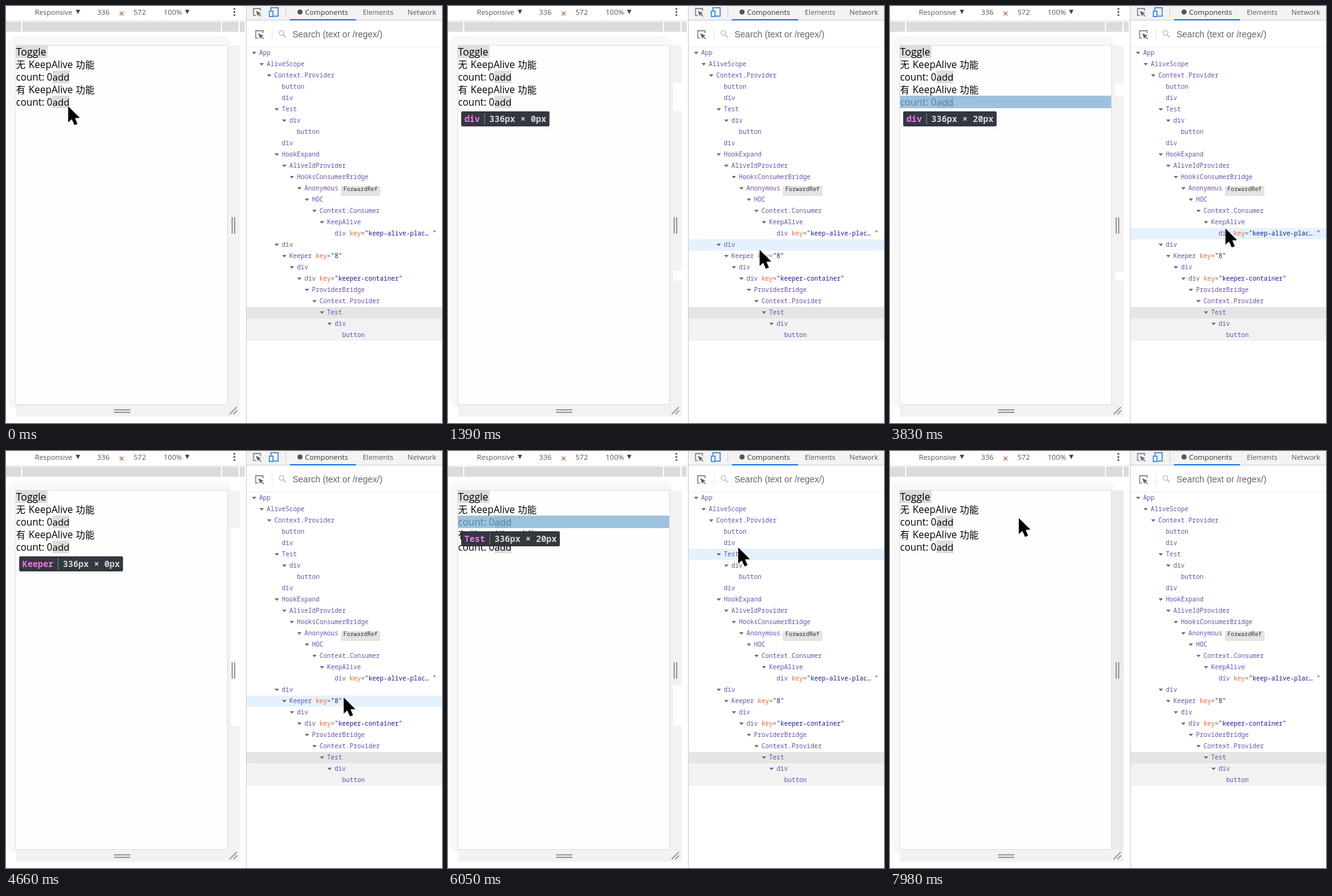
Recreate the animation shown at these times as an HTML page with a canvas. Size 694 by 665 pixels, loop 8 s.

```html
<!DOCTYPE html>
<html lang="en">
<head>
<meta charset="utf-8">
<title>Component inspector</title>
<style>
html, body { margin: 0; width: 100%; height: 100%; overflow: hidden; background: #fff; }
canvas { display: block; }
</style>
</head>
<body>
<canvas id="stage" width="694" height="665"></canvas>
<script>
const ctx = document.getElementById('stage').getContext('2d');
const LOOP = 8000;
const UI = '"Open Sans", "Noto Sans CJK SC", "Noto Sans CJK", sans-serif';
const CJK = '"Noto Sans CJK SC", "Noto Sans CJK", sans-serif';
const MONO = '"Noto Sans Mono", monospace';
const PURPLE = '#6a51b2';

// Each line: depth, name, optional key; "+" marks an expanded node.
const tree = `0+App
1+AliveScope
2+Context.Provider
3 button
3 div
3+Test
4+div
5 button
3 div
3+HookExpand
4+AliveIdProvider
5+HooksConsumerBridge
6+Anonymous
7+HOC
8+Context.Consumer
9+KeepAlive
10 div keep-alive-plac…_
3+div
4+Keeper 8
5+div
6+div keeper-container
7+ProviderBridge
8+Context.Provider
9+Test
10+div
11 button`.split('\n').map(line => {
  const [, depth, mark, name, key] = line.match(/^(\d+)([+ ])(\S+)(?: (\S+))?$/);
  return { x: 403 + 12 * depth, open: mark === '+', name, key: key && key.replace('_', ' ') };
});
const rowTop = i => 66 + 18 * i;

// Pointer moves: start, end, steps, evenly spaced waypoints.
const moves = [
  [610, 1390, 12, [[400, 425], [440, 460], [482, 445], [496, 389]]],
  [1610, 1760, 3, [[503, 399]]],
  [2410, 2560, 3, [[525, 352]]],
  [3030, 3200, 3, [[529, 365], [530, 380], [531, 391]]],
  [3390, 3830, 7, [[534, 355]]],
  [4050, 4440, 7, [[537, 393]]],
  [4660, 5090, 7, [[541, 395]]],
  [5150, 5340, 4, [[542, 343], [543, 337]]],
  [5640, 6190, 9, [[520, 270], [466, 158], [454, 146]]],
  [6340, 6460, 2, [[460, 163]]],
  [7080, 7230, 3, [[372, 150]]],
  [7380, 7710, 6, [[430, 146], [450, 170]]],
  [7860, 7980, 3, [[205, 107]]]
];

// Time, hovered row, row named in the tooltip (same row if left out).
const hovers = [
  [0, -1], [750, 20], [820, 21], [1180, 20], [1250, 18], [1320, 17],
  [1685, 18], [2485, 16], [2560, 15], [3115, 16], [3200, 17],
  [3610, 16], [4245, 17], [4375, 18], [5213, 16, 18], [5276, 15, 16], [5340, 15],
  [5709, 13], [5777, 11], [5846, 9], [5915, 7], [5984, 5], [6120, 4],
  [6460, 5], [7155, -1], [7446, 4], [7578, 5], [7920, -1]
];

// Time and the pale gaps in the strip beside the page.
const strips = [
  [0, []], [610, [[123, 168], [422, 438]]], [2410, [[123, 143], [424, 438]]],
  [4660, [[123, 438]]], [5640, [[374, 438]]], [7860, []]
];

const current = (list, t) => list.filter(e => e[0] <= t).pop();

function pointer(t) {
  let pos = [99, 160];
  for (const [t0, t1, n, points] of moves) {
    if (t < t0) break;
    const k = Math.min(n, Math.floor((t - t0) / (t1 - t0) * (n - 1) + 0.1) + 1);
    const path = [pos, ...points];
    const p = k / n * points.length;
    const i = Math.min(points.length - 1, Math.floor(p));
    pos = [0, 1].map(a => path[i][a] + (path[i + 1][a] - path[i][a]) * (p - i));
  }
  return pos;
}

function box(x, y, w, h, color, r = 0) {
  ctx.fillStyle = color;
  ctx.beginPath();
  ctx.roundRect(x, y, w, h, r);
  ctx.fill();
}

function text(s, x, y, size, color, family = UI, weight = '') {
  ctx.font = `${weight} ${size}px ${family}`;
  ctx.fillStyle = color;
  ctx.fillText(s, x, y);
}

function poly(points, color) {
  ctx.fillStyle = color;
  ctx.beginPath();
  points.forEach(([x, y]) => ctx.lineTo(x, y));
  ctx.closePath();
  ctx.fill();
}

function line(points, color, width = 1) {
  ctx.strokeStyle = color;
  ctx.lineWidth = width;
  ctx.beginPath();
  points.forEach(([x, y], i) => i ? ctx.lineTo(x, y) : ctx.moveTo(x, y));
  ctx.stroke();
}

function disc(x, y, r, color) {
  ctx.fillStyle = color;
  ctx.beginPath();
  ctx.arc(x, y, r, 0, 7);
  ctx.fill();
}

const down = (x, y, w, h, color) => poly([[x, y], [x + w, y], [x + w / 2, y + h]], color);

function inspectIcon(x, y, s) {
  line([[x + 4 * s, y + 12 * s], [x, y + 12 * s], [x, y], [x + 12 * s, y], [x + 12 * s, y + 4 * s]], '#6b6f73', 1.3);
  poly([[4, 4], [13, 8], [9.6, 9.2], [13.5, 13], [12.5, 14], [8.7, 10.2], [7.5, 13.5]]
    .map(([a, b]) => [x + a * s, y + b * s]), '#5f6368');
}

function toolbars() {
  text('Responsive', 46, 14, 11.3, '#555');
  down(111, 6, 7, 7, '#444');
  text('336', 145, 14, 11.5, '#555');
  line([[181, 9], [187, 15]], '#b9674d', 1.2);
  line([[187, 9], [181, 15]], '#b9674d', 1.2);
  text('572', 203, 14, 11.5, '#555');
  text('100%', 251, 14, 11.5, '#555');
  down(285, 6, 7, 7, '#444');
  [5, 10, 15].forEach(y => disc(363.5, y - 0.5, 1.6, '#606060'));

  box(0, 23, 382, 1, '#e4e4e4');
  [[0, 24], [26, 316], [344, 26], [372, 8]].forEach(([x, w]) => box(x, 25, w, 16, '#dbdbdb'));

  box(382, 0, 1, 665, '#cbcbcb');
  box(383, 0, 311, 23, '#f3f3f3');
  box(383, 22, 311, 1, '#cdcdcd');
  inspectIcon(394, 4, 0.93);
  ctx.strokeStyle = '#1a73e8';
  ctx.lineWidth = 1.4;
  ctx.strokeRect(421.7, 2.7, 11.5, 13.5);
  box(418, 7, 8, 11, '#f3f3f3');
  ctx.strokeRect(419.2, 8.2, 5.8, 8.6);
  box(445, 2, 1, 16, '#ccc');
  disc(468, 9.5, 4, '#555');
  text('Components', 476, 14, 11.4, '#333');
  text('Elements', 568, 14, 11.3, '#5a5a5a');
  text('Network', 639, 14, 11.5, '#5a5a5a');
  box(452, 21, 105, 2, '#1a73e8');

  inspectIcon(397.5, 39.5, 0.97);
  box(423, 35, 1, 20, '#e6e6e6');
  ctx.strokeStyle = '#c4c4c4';
  ctx.lineWidth = 1.5;
  ctx.beginPath();
  ctx.arc(438.5, 43, 3.7, 0, 7);
  ctx.stroke();
  line([[441, 45.5], [445.5, 50]], '#c4c4c4', 1.8);
  text('Search (text or /regex/)', 456, 50, 14, '#666', '"Liberation Sans", sans-serif');
  box(383, 65, 311, 1, '#ececec');
}

function device(t) {
  box(3, 48, 355, 594, '#f8f8f8', 14);
  const late = t >= 7860;
  box(353, 63, 19, 573, late ? '#ebebeb' : '#f2f2f2');
  current(strips, t)[1].forEach(([a, b]) => box(358, a, 14, b - a, '#fff'));
  box(16, 636, 356, 19, '#f2f2f2');
  box(15, 62, 338, 574, '#dedede');
  box(16, 63, 336, 572, '#fefefe');
  [359, 363].forEach(x => box(x, 337, 2, 26, '#999'));
  [643, 647].forEach(y => box(172, y, 26, 2, '#999'));
  line([[356, 651], [367.5, 639.5]], '#999', 1.8);
  line([[362, 651], [368, 645]], '#999', 1.8);

  box(16, 63, 50, 20, '#dcdcdc');
  text('Toggle', 16, 79, 16, '#000');
  ['无', '有'].forEach((word, i) => {
    const y = 99 + 40 * i;
    text(word, 16, y, 15, '#000', CJK);
    text('KeepAlive', 36, y, 15.5, '#000');
    text('功能', 111, y, 15, '#000', CJK);
    box(74, y + 4, 27, 20, '#dcdcdc');
    text('count: 0', 16, y + 20, 15.4, '#000');
    text('add', 74, y + 20, 15.2, '#000');
  });
}

// Top and height of the page area a tree row stands for.
function area(i) {
  if (i === 4) return [83, 20];
  if (i < 8) return [103, 20];
  if (i === 8) return [123, 20];
  return i >= 17 && i <= 20 ? [163, 0] : [143, 20];
}

function tooltip(i) {
  if (i < 0) return;
  const [y, h] = area(i), name = tree[i].name, size = `336px × ${h}px`, cw = 8.25;
  const end = 26 + name.length * cw, top = y + h + 5;
  box(16, y, 336, h, 'rgba(125,175,212,0.74)');
  box(21, top, end + 15 + size.length * cw + 5 - 21, 24, '#333740', 2);
  text(name, 26, top + 17, 13.75, '#ee78e6', MONO, 'bold');
  box(end + 7, top + 3, 1, 18, '#85878c');
  text(size, end + 15, top + 17, 13.75, '#d7d7d7', MONO, 'bold');
}

function treeView(hover) {
  box(383, rowTop(23), 311, 18, '#e5e5e5');
  box(383, rowTop(24), 311, 36, '#f2f2f2');
  if (hover >= 0) box(383, rowTop(hover), 311, 18, '#e5f2fd');
  tree.forEach(({ x, open, name, key }, i) => {
    const y = rowTop(i) + 12;
    if (open) down(x - 11.5, y - 5, 7, 4, '#6e6e6e');
    text(name, x, y, 10, PURPLE, MONO);
    if (key) {
      const kx = x + (name.length + 1) * 6;
      text('key', kx, y, 10, '#ef6632', MONO);
      text('=', kx + 18, y, 10, '#777', MONO);
      text(`"${key}"`, kx + 24, y, 10, '#1a1aa6', MONO);
    }
    if (name === 'Anonymous') {
      box(533, y - 7, 63, 16, '#e4e4e4', 2);
      text('ForwardRef', 537, y + 1, 9.1, '#333', MONO);
    }
  });
}

function arrow([x, y]) {
  poly([[0, 0], [0, 25.5], [5.7, 20.5], [10, 30], [14.8, 28], [10.8, 18.7], [18.6, 18.5]]
    .map(([a, b]) => [x + a, y + b]), '#000');
}

function draw() {
  const t = performance.now() % LOOP;
  const [, hover, tip = hover] = current(hovers, t);
  box(0, 0, 694, 665, '#fff');
  toolbars();
  device(t);
  tooltip(tip);
  treeView(hover);
  if (t < 60 || t >= 610) arrow(pointer(t));
  requestAnimationFrame(draw);
}
draw();
</script>
</body>
</html>
```
